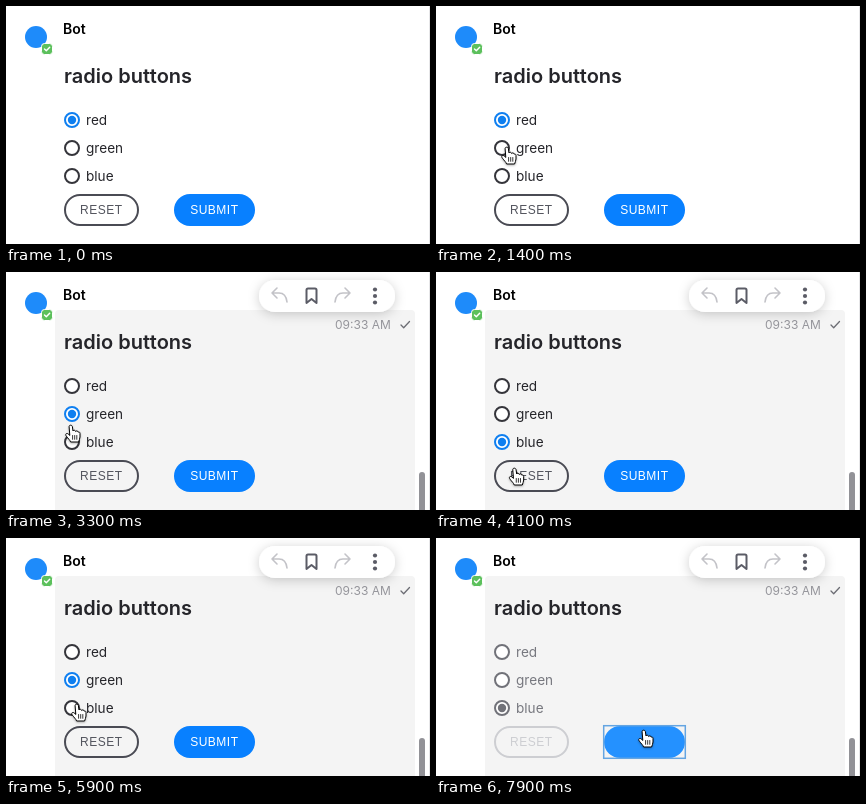
Animation of 424x238 px, one loop 8 s. Source, as an HTML page:

```html
<!DOCTYPE html>
<html lang="en">
<head>
<meta charset="utf-8">
<title>Radio buttons</title>
<style>
  html, body { margin: 0; width: 100%; height: 100%; overflow: hidden; background: #fff; }
  svg { display: block; width: 424px; height: 238px; font-family: Inter, sans-serif; }
  .title { font-size: 20px; font-weight: 600; fill: #25252a; }
  .name { font-size: 14px; font-weight: 600; fill: #000; }
  .time { font-size: 12px; fill: #96969c; }
  .line { fill: none; stroke-linecap: round; stroke-linejoin: round; }

  .radio text { font-size: 13.6px; fill: #25252a; }
  .radio .rim { fill: #fff; stroke: #35353b; stroke-width: 2; }
  .radio .dot { fill: none; }
  .radio.on .rim { stroke: #0f7ff0; }
  .radio.on .dot { fill: #0f7ff0; }

  .button { font: 12px "Liberation Sans", Arial, sans-serif; letter-spacing: .5px; text-anchor: middle; }
  #reset rect { fill: none; stroke: #4a4b54; stroke-width: 2; }
  #reset text { fill: #53555e; }
  #submit rect { fill: #0880ff; }
  #submit text { fill: #fff; }
  .focus { fill: none; stroke: #64a5e2; stroke-width: 1.5; }

  .disabled .radio text { fill: #77787f; }
  .disabled .radio .rim, .disabled .radio.on .rim { stroke: #717279; }
  .disabled .radio.on .dot { fill: #717279; }
  .disabled #reset rect { stroke: #cdced2; }
  .disabled #reset text { fill: #cdced2; }
  .loading #submit rect { fill: #2491ff; }
  .loading #submit text { fill: none; }
</style>
</head>
<body>
<svg id="stage" viewBox="0 0 424 238">
  <defs>
    <filter id="soft" x="-30%" y="-100%" width="160%" height="300%">
      <feDropShadow dx="0" dy="2" stdDeviation="6" flood-color="#000" flood-opacity=".2"/>
    </filter>
    <filter id="drop" x="-50%" y="-50%" width="200%" height="200%">
      <feDropShadow dx="0" dy="1" stdDeviation=".8" flood-color="#000" flood-opacity=".3"/>
    </filter>
  </defs>
  <rect width="424" height="238" fill="#fff"/>
  <path d="M423.5 0V238" stroke="#e6e6e8"/>

  <g id="hover">
    <rect x="49" y="38" width="360" height="210" rx="4" fill="#f4f4f4"/>
    <text class="time" x="329" y="57">09:33 AM</text>
    <path class="line" d="M395 53l2.7 2.7 5.8-6.2" stroke="#6c6d74" stroke-width="1.3"/>
    <rect x="413" y="200" width="6" height="50" rx="3" fill="#929297"/>
    <rect x="253" y="8" width="136" height="32" rx="16" fill="#fff" filter="url(#soft)"/>
    <g class="line" stroke-width="1.6">
      <path id="back" d="M271 16l-5 5 5 5M266 21h7q7 0 8 9" stroke="#c3c3c8"/>
      <use href="#back" transform="matrix(-1 0 0 1 610 0)"/>
      <path d="M300.5 31V18q0-1.5 1.5-1.5h7q1.5 0 1.5 1.5v13l-5-4z" stroke="#5b5c66" stroke-width="2"/>
    </g>
    <g fill="#5b5c66">
      <circle cx="369" cy="17.5" r="2.1"/><circle cx="369" cy="24" r="2.1"/><circle cx="369" cy="30.5" r="2.1"/>
    </g>
  </g>

  <circle cx="30" cy="31" r="11" fill="#1e8bfa"/>
  <rect x="35.5" y="37.5" width="11" height="11" rx="3" fill="#5cc05c" stroke="#fff"/>
  <path class="line" d="M38.5 43l1.8 1.8 3.4-3.6" stroke="#fff" stroke-width="1.4"/>
  <text class="name" x="57" y="28">Bot</text>
  <text class="title" x="58" y="77">radio buttons</text>

  <g id="radios"></g>

  <g id="reset" class="button">
    <rect x="59" y="189" width="73" height="30" rx="15"/>
    <text x="95.3" y="208">RESET</text>
  </g>
  <g id="submit" class="button">
    <rect x="168" y="188" width="81" height="32" rx="16"/>
    <text x="208.3" y="208">SUBMIT</text>
  </g>
  <rect id="resetFocus" class="focus" x="57.7" y="187.7" width="75.6" height="32.6"/>
  <rect id="submitFocus" class="focus" x="167.7" y="187.7" width="81.6" height="32.6"/>

  <g id="arrow" filter="url(#drop)">
    <path d="M0 0V14.5L3.4 11.4 5.8 17 8.6 15.8 6.2 10.4H11Z" fill="#000" stroke="#fff"/>
  </g>
  <g id="hand" filter="url(#drop)">
    <path d="M-1.9 1.7C-1.9-.3 1.1-.3 1.4 1.7L2 6C2.4 4.8 4.4 5 4.6 6.5 5.2 5.5 7 5.8 7.2 7.2 8 6.6 9 7.2 9 8.5V12C9 14 8 15 7.6 17H-.4C-1 15-3 13.5-4.5 11.3-6.5 8.8-4 7.6-2.6 9.2L-1.2 10.4Z"
      fill="#fff" stroke="#000" stroke-linejoin="round"/>
    <path class="line" d="M1.6 10.5v3.8M3.7 10.5v3.8M5.8 10.5v3.8" stroke="#000" stroke-width=".8"/>
  </g>
</svg>
<script>
const LOOP = 8000, TICK = 100;
const $ = id => document.getElementById(id);

// Pointer stops: time, x, y, shape on arrival
const pointerPath = [
  [100, 337, 230, 'arrow'],
  [600, 237, 203, 'hand'],
  [700, 237, 203, 'hand'],
  [800, 165, 128, 'arrow'],
  [1000, 78, 142, 'arrow'],
  [1100, 78, 142, 'arrow'],
  [1200, 75, 142, 'hand'],
  [1400, 71, 141, 'hand'],
  [3200, 71, 141, 'hand'],
  [3300, 65, 153, 'hand'],
  [3700, 64, 168, 'hand'],
  [3900, 64, 168, 'hand'],
  [4200, 86, 210, 'hand'],
  [4400, 86, 210, 'hand'],
  [4700, 73, 128, 'arrow'],
  [5100, 68, 143, 'hand'],
  [5500, 68, 143, 'hand'],
  [5900, 71, 166, 'hand'],
  [6400, 71, 166, 'hand'],
  [6900, 208, 192, 'hand'],
  [LOOP, 208, 192, 'hand']
];

const choices = [[0, 'red'], [2900, 'green'], [3900, 'blue'], [4300, 'red'], [5500, 'green'], [6400, 'blue']];

$('radios').innerHTML = ['red', 'green', 'blue'].map((label, i) => `
  <g class="radio" id="${label}" transform="translate(66 ${114 + 28 * i})">
    <circle class="rim" r="7"/><circle class="dot" r="4.2"/><text x="14" y="5">${label}</text>
  </g>`).join('');

const show = (id, visible) => { $(id).style.display = visible ? '' : 'none'; };

function pointerAt(t) {
  const next = pointerPath.findIndex(stop => stop[0] > t);
  if (next < 1) return { shape: null };
  const [t0, x0, y0, shape] = pointerPath[next - 1];
  const [t1, x1, y1] = pointerPath[next];
  const k = (t - t0) / (t1 - t0);
  return { x: x0 + (x1 - x0) * k, y: y0 + (y1 - y0) * k, shape };
}

function draw(now) {
  const t = Math.floor(now % LOOP / TICK) * TICK;

  const chosen = choices.filter(([start]) => start <= t).pop()[1];
  for (const radio of $('radios').children) radio.classList.toggle('on', radio.id === chosen);

  $('hover').style.opacity = Math.min(1, Math.max(0, (t - 2400) / 200));
  $('stage').classList.toggle('disabled', t >= 7800);
  $('stage').classList.toggle('loading', t >= 7800);
  show('resetFocus', t >= 4300 && t < 5500);
  show('submitFocus', t >= 7700);

  const pointer = pointerAt(t);
  for (const shape of ['arrow', 'hand']) {
    show(shape, shape === pointer.shape);
    if (shape === pointer.shape) $(shape).setAttribute('transform', `translate(${pointer.x} ${pointer.y})`);
  }
}

const start = performance.now();
function frame() {
  draw(performance.now() - start);
  requestAnimationFrame(frame);
}
frame();
</script>
</body>
</html>
```
